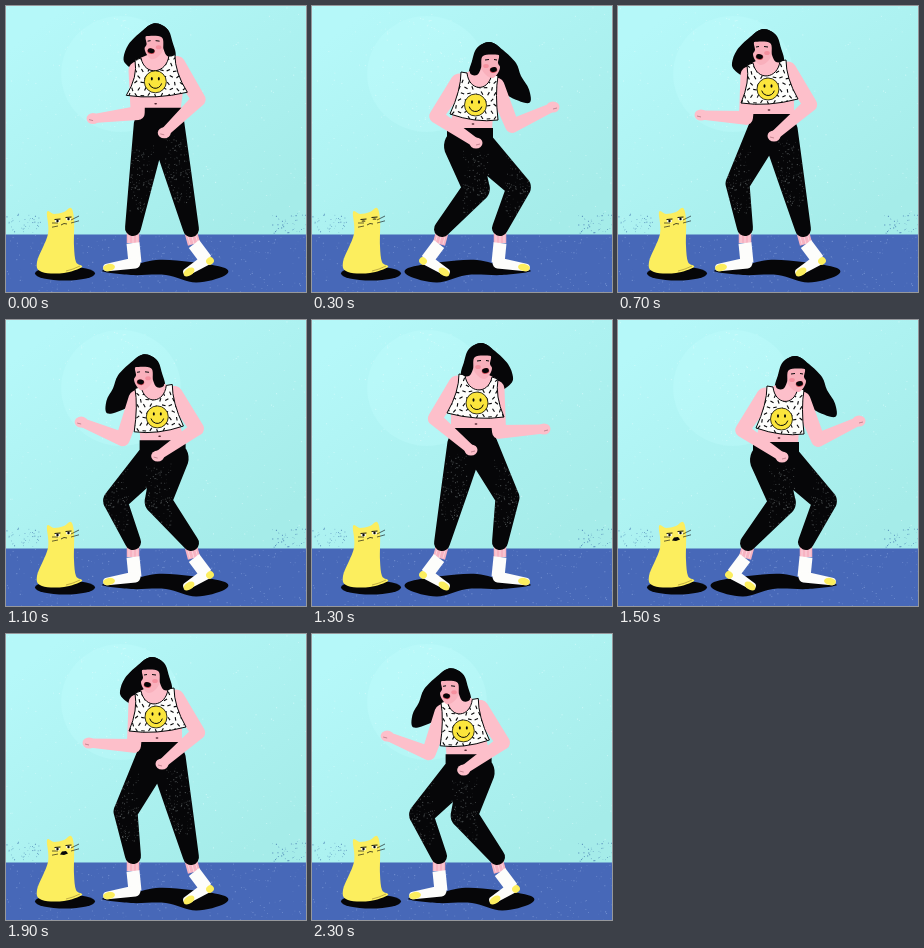
Recreate the animation shown at these times as an HTML page with a canvas. Size 300x286 px, loop 2.4 s.

```html
<!DOCTYPE html>
<html>
<head>
<meta charset="utf-8">
<style>
html, body { margin: 0; width: 300px; height: 286px; overflow: hidden; }
canvas { display: block; }
</style>
</head>
<body>
<canvas id="stage" width="300" height="286"></canvas>
<script>
const ctx = document.getElementById('stage').getContext('2d');
const BLACK = '#060608', SKIN = '#fdbfca', FACE = '#f9b0bc', YELLOW = '#fcee5e', WHITE = '#fdfdfb';
const MIRROR = 315, STEP = 100;

// The dancer, facing left, slides between these two poses; limbs are solved from them.
const TALL = { head: [146, 44], strapL: [132, 58], strapR: [164, 55], hemL: [123, 97], hemR: [180, 93],
  fistL: [83, 109], fistR: [156, 130], waist: [154, 109] };
const LOW = { head: [138, 57], strapL: [132, 69], strapR: [162, 67], hemL: [129, 114], hemR: [177, 108],
  fistL: [74, 101], fistR: [151, 137], waist: [157, 123] };
const ANKLE_L = [127, 222], ANKLE_R = [185, 223];
// How far the knees are bent on each beat of one sway.
const BENDS = [0, 0.65, 1, 1, 0.87, -0.45];

const mix = (a, b, k) => a.map((v, i) => v + (b[i] - v) * k);
const add = (p, x, y) => [p[0] + x, p[1] + y];

// Middle joint of a two-bone limb from a to b.
function joint(a, b, upper, lower, side) {
  const dx = b[0] - a[0], dy = b[1] - a[1], d = Math.hypot(dx, dy);
  const along = d > upper + lower ? d * upper / (upper + lower) : (upper ** 2 - lower ** 2 + d * d) / (2 * d);
  const off = side * Math.sqrt(Math.max(0, upper ** 2 - along ** 2));
  return add(a, (dx * along - dy * off) / d, (dy * along + dx * off) / d);
}

function seeded(seed) {
  return () => (seed = (seed * 16807) % 2147483647) / 2147483647;
}

function fill(color) {
  ctx.fillStyle = color;
  ctx.fill();
}

function line(points, color, width) {
  ctx.beginPath();
  points.forEach(p => ctx.lineTo(...p));
  ctx.strokeStyle = color;
  ctx.lineWidth = width;
  ctx.stroke();
}

function outline(width) {
  ctx.strokeStyle = BLACK;
  ctx.lineWidth = width;
  ctx.stroke();
}

function poly(points, color) {
  ctx.beginPath();
  points.forEach(p => ctx.lineTo(...p));
  fill(color);
}

function oval(x, y, rx, ry, color, tilt = 0) {
  ctx.beginPath();
  ctx.ellipse(x, y, rx, ry, tilt, 0, 7);
  fill(color);
}

// Smooth closed shape through the given points.
function blob(points, color) {
  const n = points.length, at = i => points[(i + n) % n];
  ctx.beginPath();
  ctx.moveTo(...points[0]);
  for (let i = 0; i < n; i++) {
    const [a, b, c, d] = [at(i - 1), at(i), at(i + 1), at(i + 2)];
    ctx.bezierCurveTo(b[0] + (c[0] - a[0]) / 6, b[1] + (c[1] - a[1]) / 6,
      c[0] - (d[0] - b[0]) / 6, c[1] - (d[1] - b[1]) / 6, c[0], c[1]);
  }
  fill(color);
}

// Adds a tapered, round-ended segment to the current path.
function segment(a, b, ra, rb) {
  const angle = Math.atan2(b[1] - a[1], b[0] - a[0]), q = Math.PI / 2;
  ctx.moveTo(a[0] + ra * Math.cos(angle + q), a[1] + ra * Math.sin(angle + q));
  ctx.arc(...a, ra, angle + q, angle + 3 * q);
  ctx.arc(...b, rb, angle - q, angle + q);
  ctx.closePath();
}

function specks(seed, count, x, y, w, h, color) {
  const random = seeded(seed);
  ctx.fillStyle = color;
  for (let i = 0; i < count; i++) {
    const size = 0.4 + random() * 0.8;
    ctx.fillRect(x + random() * w, y + random() * h, size, size);
  }
}

function drawRoom() {
  const sky = ctx.createLinearGradient(60, 0, 230, 228);
  sky.addColorStop(0, '#b5f8f9');
  sky.addColorStop(1, '#a5ece9');
  ctx.fillStyle = sky;
  ctx.fillRect(0, 0, 300, 286);
  ctx.fillStyle = '#4768b8';
  ctx.fillRect(0, 228.5, 300, 58);
  oval(115, 68, 60, 58, 'rgba(200,255,255,.25)');
  specks(11, 260, 0, 0, 300, 228, 'rgba(230,255,255,.5)');
  specks(23, 150, 60, 10, 110, 110, 'rgba(235,255,255,.5)');
  specks(37, 300, 0, 229, 300, 57, 'rgba(150,175,230,.5)');
  for (const x of [0, 266]) specks(x + 5, 40, x, 207, 34, 20, '#5a93bd');
}

function drawCat(meow, squint) {
  oval(59, 267.5, 30, 7, BLACK);
  blob([[41, 206], [48, 208], [58, 206], [65, 202], [68, 213], [68, 240], [70, 256], [76, 261],
    [58, 267], [36, 266], [31, 256], [42, 228]], YELLOW);
  line([[60, 265], [67, 263], [74, 260]], '#a8923a', 0.7);
  for (const tilt of [-1, 1]) {
    const x = 57 - tilt * 5.5, y = 213 + tilt;
    if (!squint) oval(x, y + 1, 2.6, 1.5, WHITE);
    oval(x, y + 1, squint ? 2 : 1.2, squint ? 0.6 : 1.3, BLACK);
    line([[x - 3, y - 0.5], [x + 3, y - 1]], BLACK, 0.9);
  }
  for (const y of [0, 3]) {
    line([[65, 214 + y], [73, 210 + y * 1.6]], BLACK, 0.6);
    line([[52, 217 + y], [46, 217 + y * 1.4]], BLACK, 0.6);
  }
  if (meow) poly([[54, 220.5], [56, 217.5], [60, 217], [62, 219.5], [58, 221]], BLACK);
  else line([[55, 219], [58, 217.5], [61, 218]], BLACK, 0.7);
}

function drawFoot(ankle, cuff, heel, toe) {
  line([add(ankle, 0, 4), cuff], '#f7b3c2', 12.5);
  for (const x of [-4, 0, 4]) line([add(ankle, x, 4), add(cuff, x, 0)], '#fbd5dc', 1);
  line([cuff, heel], WHITE, 13);
  ctx.beginPath();
  segment(heel, toe, 5.5, 3.8);
  fill(WHITE);
  const tilt = Math.atan2(heel[1] - toe[1], heel[0] - toe[0]);
  oval(toe[0] + 2, toe[1], 6, 3.6, YELLOW, tilt);
}

function drawFeet() {
  blob([[96, 265], [122, 261], [150, 254], [185, 256], [219, 262], [218, 270], [190, 276.5],
    [160, 269], [125, 269]], BLACK);
  drawFoot(ANKLE_L, [127, 237], [129, 257], [101, 261.5]);
  drawFoot(ANKLE_R, [188, 238], [200, 254], [181, 266]);
  oval(204, 255, 4, 3.6, YELLOW, -0.7);
}

function drawPants(waist) {
  const hipL = add(waist, -8, 17), hipR = add(waist, 8, 17);
  const kneeL = joint(hipL, ANKLE_L, 58, 45, 1), kneeR = joint(hipR, ANKLE_R, 45, 53, 1);
  ctx.save();
  ctx.beginPath();
  ctx.rect(waist[0] - 23, waist[1] - 1, 46, 18);
  segment(hipL, kneeL, 17, 12);
  segment(kneeL, ANKLE_L, 12, 8);
  segment(hipR, kneeR, 18, 13.5);
  segment(kneeR, ANKLE_R, 13.5, 8);
  fill(BLACK);
  ctx.clip();
  for (const [x, y] of [kneeL, kneeR]) specks(53, 140, x - 13, y - 38, 26, 70, 'rgba(190,200,200,.35)');
  ctx.restore();
}

function drawArm(shoulder, fist, upper, lower) {
  const elbow = joint(shoulder, fist, upper, lower, -1);
  ctx.beginPath();
  segment(shoulder, elbow, 8.5, 7);
  segment(elbow, fist, 7, 4.5);
  fill(SKIN);
  oval(...fist, 6.5, 5.5, SKIN);
  line([add(fist, -4, 1), add(fist, 0, 2)], '#a0606c', 0.6);
}

function drawShirt({ strapL: a, strapR: b, hemL, hemR }) {
  const [cx, cy] = add(mix(hemL, hemR, 0.5), -1.5, -12);
  ctx.save();
  ctx.beginPath();
  ctx.moveTo(a[0] - 3, a[1] + 1);
  ctx.lineTo(a[0] + 3, a[1] - 1);
  ctx.bezierCurveTo(a[0] + 7, a[1] + 18, b[0] - 4, b[1] + 18, b[0] - 2, b[1]);
  ctx.lineTo(b[0] + 4, b[1] - 1);
  ctx.quadraticCurveTo(b[0] + 4, b[1] + 17, ...hemR);
  ctx.quadraticCurveTo(cx, cy + 18, ...hemL);
  ctx.quadraticCurveTo(a[0], a[1] + 18, a[0] - 3, a[1] + 1);
  ctx.closePath();
  fill(WHITE);
  outline(1);
  ctx.clip();
  const random = seeded(97);
  for (let row = -4; row < 4; row++) {
    for (let col = -5; col < 6; col++) {
      const x = cx + col * 6.5 + (row & 1) * 3, y = cy + row * 6 + random() * 2, turn = random() * Math.PI;
      const dx = 1.8 * Math.cos(turn), dy = 1.8 * Math.sin(turn);
      line([[x - dx, y - dy], [x + dx, y + dy]], BLACK, 1.1);
    }
  }
  ctx.restore();
  oval(cx, cy, 11, 11, '#fbe53c');
  outline(0.8);
  for (const x of [-3.5, 3.5]) oval(cx + x, cy - 3, 1, 1.7, BLACK);
  ctx.beginPath();
  ctx.arc(cx, cy, 6.5, 0.25, Math.PI - 0.25);
  outline(1);
}

function drawHair(head, bend) {
  const at = (x, y) => add(head, x, y), swing = Math.max(0, bend);
  const side = at(-32, 13), tip = at(-19 - 21 * swing, 27 + 13 * swing), nape = at(-3, 17);
  blob([at(-1, -21), at(12, -15), at(17, -2), at(20, 11), at(12, 15), nape, add(mix(nape, tip, 0.5), 3, 4),
    tip, add(mix(side, tip, 0.5), -4, 0), side, at(-27, 0), at(-14, -13)], BLACK);
}

function drawFace(head) {
  const at = (x, y) => add(head, x, y);
  blob([at(-9, -9), at(-9, 0), at(-11, 4), at(-9, 10), at(-4, 15), at(3, 12), at(8, 4), at(7, -9)], FACE);
  blob([at(0, -21), at(11, -16), at(16, -3), at(19, 10), at(12, 12), at(8, 5), at(6, -7), at(-10, -8),
    at(-14, -5), at(-10, -16)], BLACK);
  line([at(-8, -3), at(-5, -3.5)], BLACK, 1);
  line([at(0, -3.5), at(4, -3)], BLACK, 1);
  oval(...at(3, 3), 2.8, 2, '#f5909f');
  oval(...at(-4.5, 7), 3.8, 2.8, '#c8434f', 0.2);
  oval(...at(-4.5, 6.6), 3.4, 2.4, BLACK, 0.2);
}

function drawDancer(bend) {
  const p = {};
  for (const name in TALL) p[name] = mix(TALL[name], LOW[name], bend);
  const { head, strapL, strapR, waist } = p;
  drawFeet();
  drawHair(head, bend);
  poly([add(head, -2, 8), add(head, 8, 4), strapR, add(strapR, 8, 5), add(p.hemR, -4, -4), add(waist, 22, 1),
    add(waist, -22, 1), add(p.hemL, 5, -4), add(strapL, -5, 5), strapL], SKIN);
  drawPants(waist);
  oval(waist[0] - 3, waist[1] - 5, 1.4, 0.8, '#4a1f29');
  drawArm(add(strapL, -1, 11), p.fistL, 43, 45);
  drawArm(add(strapR, 6, 9), p.fistR, 41, 48);
  drawShirt(p);
  drawFace(head);
}

function frame(now) {
  const step = Math.floor(now / STEP) % 24, beat = step % 12;
  ctx.lineJoin = 'round';
  drawRoom();
  drawCat(step >= 14 && step < 21, step >= 2 && step < 6);
  ctx.save();
  if (beat >= 1 && beat <= 6) ctx.transform(-1, 0, 0, 1, MIRROR, 0);
  drawDancer(BENDS[(beat + 5) % 6]);
  ctx.restore();
  requestAnimationFrame(frame);
}
requestAnimationFrame(frame);
</script>
</body>
</html>
```
